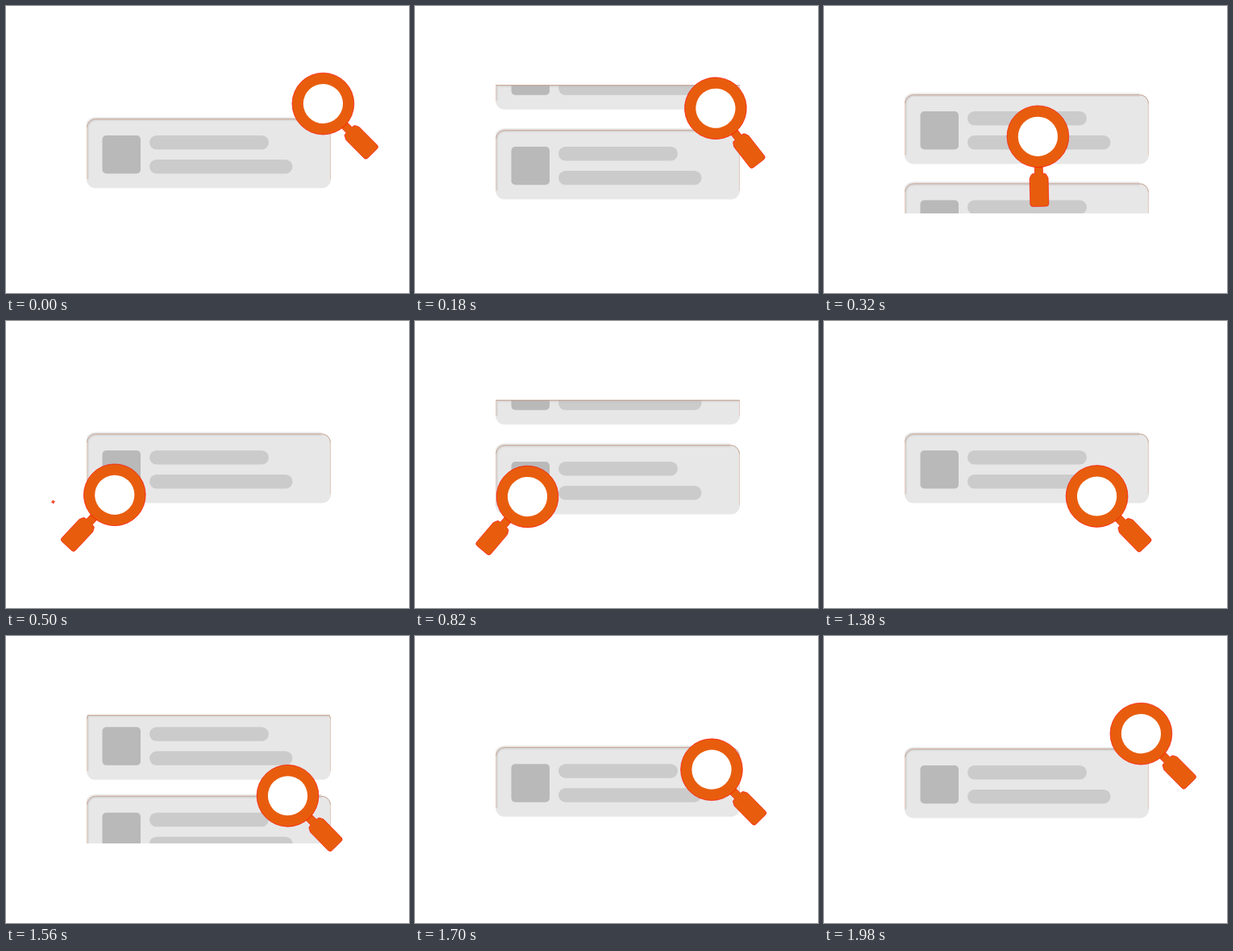
An HTML page that plays this animation: 500 by 357 pixels, repeating every 2080 ms.

```html
<!DOCTYPE html>
<html lang="en">
<head>
<meta charset="utf-8">
<title>Search animation</title>
<style>
  html, body { margin: 0; width: 100%; height: 100%; overflow: hidden; background: #fff; }
  svg { display: block; width: 100%; height: 100%; }
</style>
</head>
<body>
<svg viewBox="0 0 500 357">
  <defs>
    <clipPath id="window"><rect x="100" y="98" width="303" height="160"/></clipPath>
    <g id="card">
      <rect x="100" width="303" height="86.5" rx="11" fill="#e7e7e7"/>
      <rect x="119.5" y="21" width="47.5" height="47.5" rx="5" fill="#b9b9b9"/>
      <rect x="178" y="21" width="148" height="17.5" rx="8.75" fill="#cbcbcb"/>
      <rect x="178" y="51" width="177.5" height="17.5" rx="8.75" fill="#cbcbcb"/>
    </g>
  </defs>
  <g clip-path="url(#window)" fill="none">
    <g class="card"><use href="#card"/></g>
    <g class="card"><use href="#card"/></g>
    <g class="rim">
      <path class="shade" stroke="#aaa" stroke-opacity=".25" stroke-width="5"/>
      <path class="side" stroke="#e2c9bc"/>
      <path class="top" stroke="#c9a591"/>
    </g>
    <g class="rim">
      <path class="shade" stroke="#aaa" stroke-opacity=".25" stroke-width="5"/>
      <path class="side" stroke="#e2c9bc"/>
      <path class="top" stroke="#c9a591"/>
    </g>
  </g>
  <g fill="#e85d0d" stroke="#f00" stroke-width=".6">
    <path class="star"/>
    <path class="star"/>
    <g id="lens">
      <path d="M12 -5H46V-6Q46 -9 48 -9.5L52 -11.5H83.5Q87 -11.5 87 -8V8Q87 11.5 83.5 11.5H52L48 9.5Q46 9 46 6V5H12Z"/>
      <circle r="38.4"/>
      <circle r="24.6" fill="#fff" stroke="none"/>
    </g>
  </g>
</svg>
<script>
const LOOP = 2080, LAST = 1980, STEP = 20;
const CYCLE = 640, REST = 140, HEIGHT = 86.5, RADIUS = 11;
const WINDOW_TOP = 98, WINDOW_BOTTOM = 258, LEFT = 100, RIGHT = 403;
const PIVOT = 22; // distance from the glass centre to the rotation point

const all = selector => [...document.querySelectorAll(selector)];
const cards = all('.card'), rims = all('.rim'), stars = all('.star');
const lens = document.getElementById('lens');

const ease = (t, start, duration) => {
  const u = Math.min(1, Math.max(0, (t - start) / duration));
  return u * u * (3 - 2 * u);
};

const stops = [
  { x: 408.9, y: 137.2, angle: 45.3 },
  { x: 110.7, y: 235.4, angle: 135.7 },
  { x: 353.9, y: 233.8, angle: 45.9 },
  { x: 408.9, y: 137.2, angle: 45.3 }
];
const moves = [[106, 440], [764, 376], [1391, 589]];

const sparkles = [
  { x: 58.5, y: 225, start: 480, life: 280, size: 10 },
  { x: 421.5, y: 251.5, start: 985, life: 395, size: 13 }
];

function drawCard(i, top) {
  cards[i].setAttribute('transform', `translate(0 ${top.toFixed(2)})`);
  const bottom = top + HEIGHT;
  const visible = bottom > WINDOW_TOP && top < WINDOW_BOTTOM;
  rims[i].style.display = visible ? '' : 'none';
  if (!visible) return;

  // The rim follows the visible part of the card.
  const edge = Math.max(top, WINDOW_TOP);
  const rise = Math.max(0, RADIUS - (edge - top));
  const inset = RADIUS - Math.sqrt(RADIUS ** 2 - rise ** 2);
  const shoulder = edge + rise;
  const low = Math.max(shoulder, Math.min(bottom - RADIUS, WINDOW_BOTTOM));
  const l = LEFT + .5, r = RIGHT - .5, y = edge + .5;
  const arc = `A${RADIUS} ${RADIUS} 0 0 1 `;
  const corner = `M${l} ${shoulder}${arc}${l + inset} ${y}`;
  const topLine = `${corner}H${r - inset}${arc}${r} ${shoulder}`;
  const [shade, side, line] = rims[i].children;
  shade.setAttribute('d', `M${l} ${low}V${shoulder}${arc}${l + inset} ${y}H${r - inset}`);
  side.setAttribute('d', `M${l} ${low}V${shoulder}M${r} ${low}V${shoulder}`);
  line.setAttribute('d', topLine);
}

function drawCards(t) {
  const k = Math.min(2, Math.floor((t + 20) / CYCLE));
  const phase = t - k * CYCLE;
  drawCard(0, REST + 161 * ease(phase, 100, 440));
  drawCard(1, REST - 160 * (1 - ease(phase, -20, 470)));
}

function drawLens(t) {
  const at = key => moves.reduce(
    (value, [start, duration], i) =>
      value + (stops[i + 1][key] - stops[i][key]) * ease(t, start, duration),
    stops[0][key]);
  lens.setAttribute('transform',
    `translate(${at('x')} ${at('y')}) rotate(${at('angle')}) translate(${-PIVOT} 0)`);
}

function drawStar(path, { x, y, start, life, size }, t) {
  const u = (t - start) / life;
  const visible = u > 0 && u < 1;
  path.style.display = visible ? '' : 'none';
  if (!visible) return;
  const radius = size * Math.sin(Math.PI * u);
  const turn = -.47 * (t - start) * Math.PI / 180;
  const points = Array.from({ length: 8 }, (_, i) => {
    const r = i % 2 ? radius * .42 : radius;
    const a = turn + i * Math.PI / 4;
    return `${(x + r * Math.cos(a)).toFixed(2)} ${(y + r * Math.sin(a)).toFixed(2)}`;
  });
  path.setAttribute('d', `M${points.join('L')}Z`);
}

function render(ms) {
  const t = Math.min(LAST, Math.floor((ms % LOOP) / STEP) * STEP);
  drawCards(t);
  drawLens(t);
  stars.forEach((path, i) => drawStar(path, sparkles[i], t));
}

const began = performance.now();
function tick() {
  render(performance.now() - began);
  requestAnimationFrame(tick);
}
tick();
</script>
</body>
</html>
```
